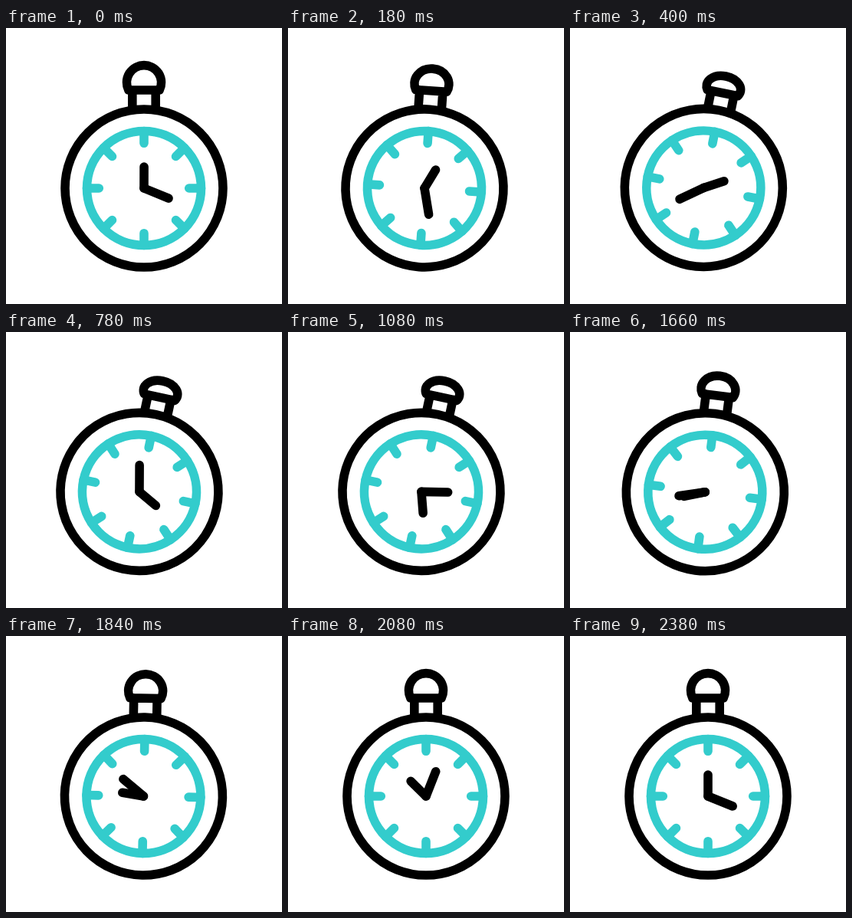
These frames come from a looping animation (360x360 px, 2.4 s). An HTML page:

```html
<!DOCTYPE html>
<html lang="en">
<head>
<meta charset="utf-8">
<title>Stopwatch</title>
<style>
  html, body { margin: 0; width: 100%; height: 100%; overflow: hidden; background: #fff; }
  svg { display: block; width: 100vw; height: 100vh; }
  g { fill: none; stroke: #000; stroke-width: 11.6; stroke-linecap: round; stroke-linejoin: round; }
  .dial { stroke: #33cccc; }
</style>
</head>
<body>
<svg viewBox="0 0 360 360">
  <g id="watch">
    <path id="knob"/>
    <g transform="translate(180 209)">
      <circle r="103"/>
      <g class="dial">
        <circle r="74.5"/>
        <path id="ticks"/>
      </g>
      <path id="hour" d="M0 0V-28"/>
      <path id="minute" d="M0 0V-34.7"/>
    </g>
  </g>
</svg>
<script>
  const LOOP = 2400, SWEEP = 2380;
  const TILT = 12, MOVE = 470, RETURN_AT = 1460;
  const $ = id => document.getElementById(id);
  const watch = $('watch'), knob = $('knob'), hour = $('hour'), minute = $('minute');

  const ease = x => {
    x = Math.min(1, Math.max(0, x));
    return x * x * (3 - 2 * x);
  };
  const turn = (el, deg, pivot = '') => el.setAttribute('transform', `rotate(${deg} ${pivot})`);

  $('ticks').setAttribute('d', Array.from({ length: 8 }, (_, i) => {
    const a = i * Math.PI / 4, x = Math.cos(a), y = Math.sin(a);
    return `M${x * 74.5} ${y * 74.5}L${x * 58.7} ${y * 58.7}`;
  }).join(''));

  // Neck plus a cap whose height shrinks as it is pressed.
  function knobPath(press) {
    const bar = 81 + 2 * press;
    const ry = 22.5 * (1 - press / 3);
    return `M164.8 ${bar}V104M195.2 ${bar}V104` +
      `M159.8 ${bar}A22.5 ${ry} 0 1 1 200.2 ${bar}Z`;
  }

  function draw(t) {
    const press = ease(t / MOVE) - ease((t - RETURN_AT) / MOVE);
    const angle = 360 * Math.min(1, t / SWEEP);
    turn(watch, TILT * press, '180 180');
    knob.setAttribute('d', knobPath(press));
    turn(hour, angle);
    turn(minute, 112 + 2 * angle);
  }

  const start = performance.now();
  function tick() {
    draw((performance.now() - start) % LOOP);
    requestAnimationFrame(tick);
  }
  tick();
</script>
</body>
</html>
```
